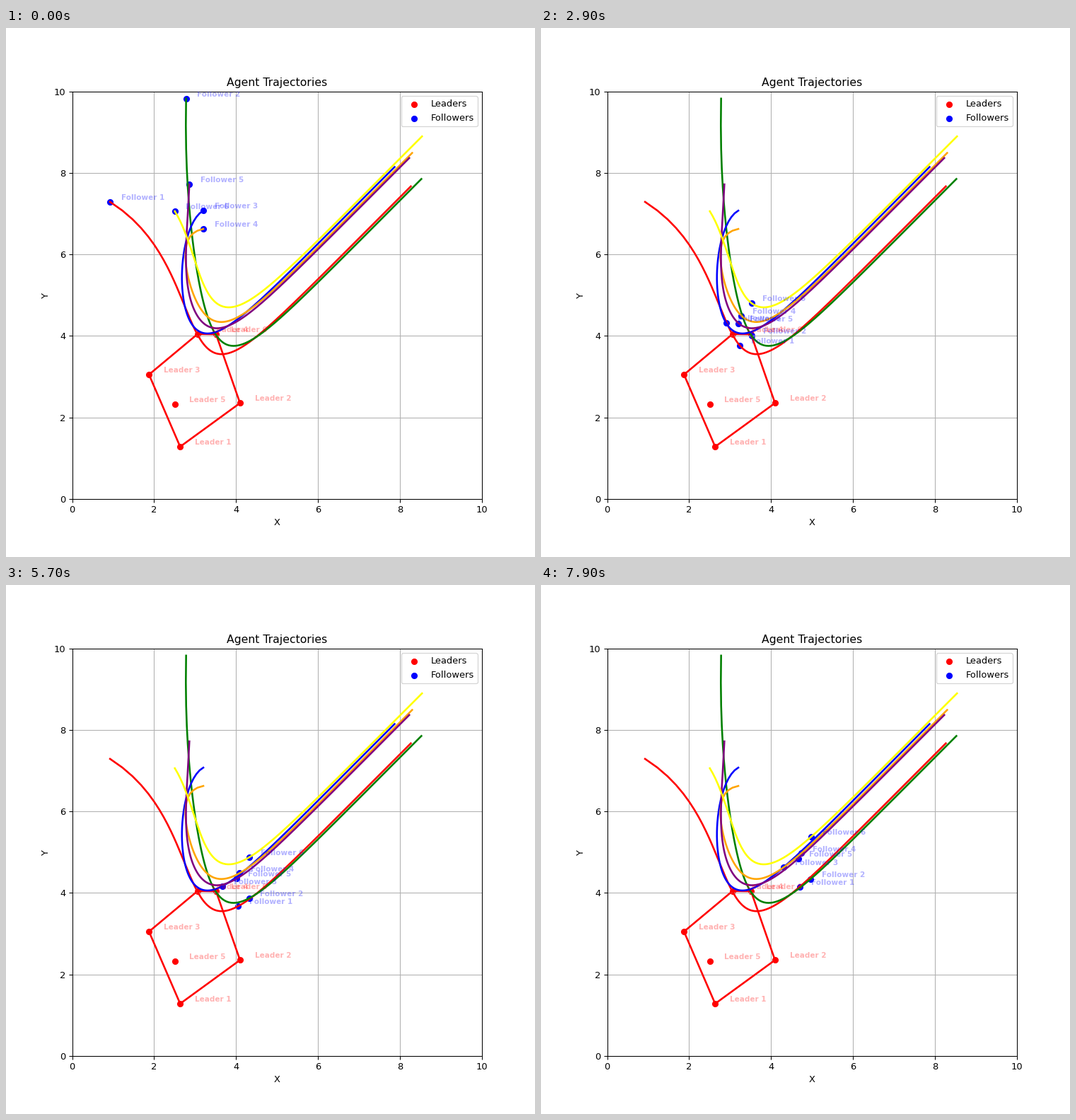
Write a matplotlib script that moves like this. It is 748 px wide and 748 px high and loops after 8 s.

```python
import numpy as np
import matplotlib.pyplot as plt
from matplotlib.animation import FuncAnimation

FRAMES, INTERVAL = 80, 100
SIZE = 748
STEPS = 200
GAIN = 0.0517                       # pull per step along each link
VELOCITY = np.array([0.0297, 0.03])  # common drift of the leaders

LEADERS = np.array([(2.635, 1.28), (4.095, 2.35), (1.875, 3.05),
                    (3.06, 4.045), (2.505, 2.32), (3.51, 4.04)])
STARTS = np.array([(0.925, 7.29), (2.78, 9.825), (3.2, 7.075),
                   (3.2, 6.625), (2.86, 7.72), (2.505, 7.06)])
HULL = [0, 1, 5, 3, 2, 0]
CHAIN = [2, 1, 0, 3, 4, 5]          # followers linked in this order
COLORS = ["red", "green", "blue", "orange", "purple", "yellow"]


def simulate():
    """Each follower is drawn to its chain neighbours and its own leader."""
    links = np.zeros((6, 6))
    for a, b in zip(CHAIN, CHAIN[1:]):
        links[a, b] = links[b, a] = 1
    degree = links.sum(axis=1)[:, None]
    pos, track = STARTS, [STARTS]
    for n in range(STEPS - 1):
        goal = LEADERS + VELOCITY * n
        pos = pos + GAIN * (links @ pos - degree * pos + goal - pos)
        track.append(pos)
    return np.array(track)


track = simulate()

fig, ax = plt.subplots(figsize=(8, 8), dpi=SIZE / 8)
ax.set(xlim=(0, 10), ylim=(0, 10), xlabel="X", ylabel="Y",
       title="Agent Trajectories")
ax.grid(True)


def label_pos(p):
    return p[0] + 0.8, p[1] + 0.05


def add_labels(name, points, color):
    return [ax.text(*label_pos(p), f"{name} {i}", color=color, alpha=0.3,
                    fontsize=8, weight="bold", ha="center", clip_on=True)
            for i, p in enumerate(points, 1)]


ax.scatter(*LEADERS.T, color="red", label="Leaders")
dots = ax.scatter(*STARTS.T, color="blue", label="Followers")
ax.plot(*LEADERS[HULL].T, color="red", lw=2)
for i, color in enumerate(COLORS):
    ax.plot(*track[:, i].T, color=color, lw=2)
add_labels("Leader", LEADERS, "red")
tags = add_labels("Follower", STARTS, "blue")
ax.legend(loc="upper right")


def update(n):
    dots.set_offsets(track[n])
    for tag, p in zip(tags, track[n]):
        tag.set_position(label_pos(p))
    return [dots, *tags]


anim = FuncAnimation(fig, update, frames=FRAMES, interval=INTERVAL,
                     repeat=True, repeat_delay=0, blit=False)
plt.show()
```
